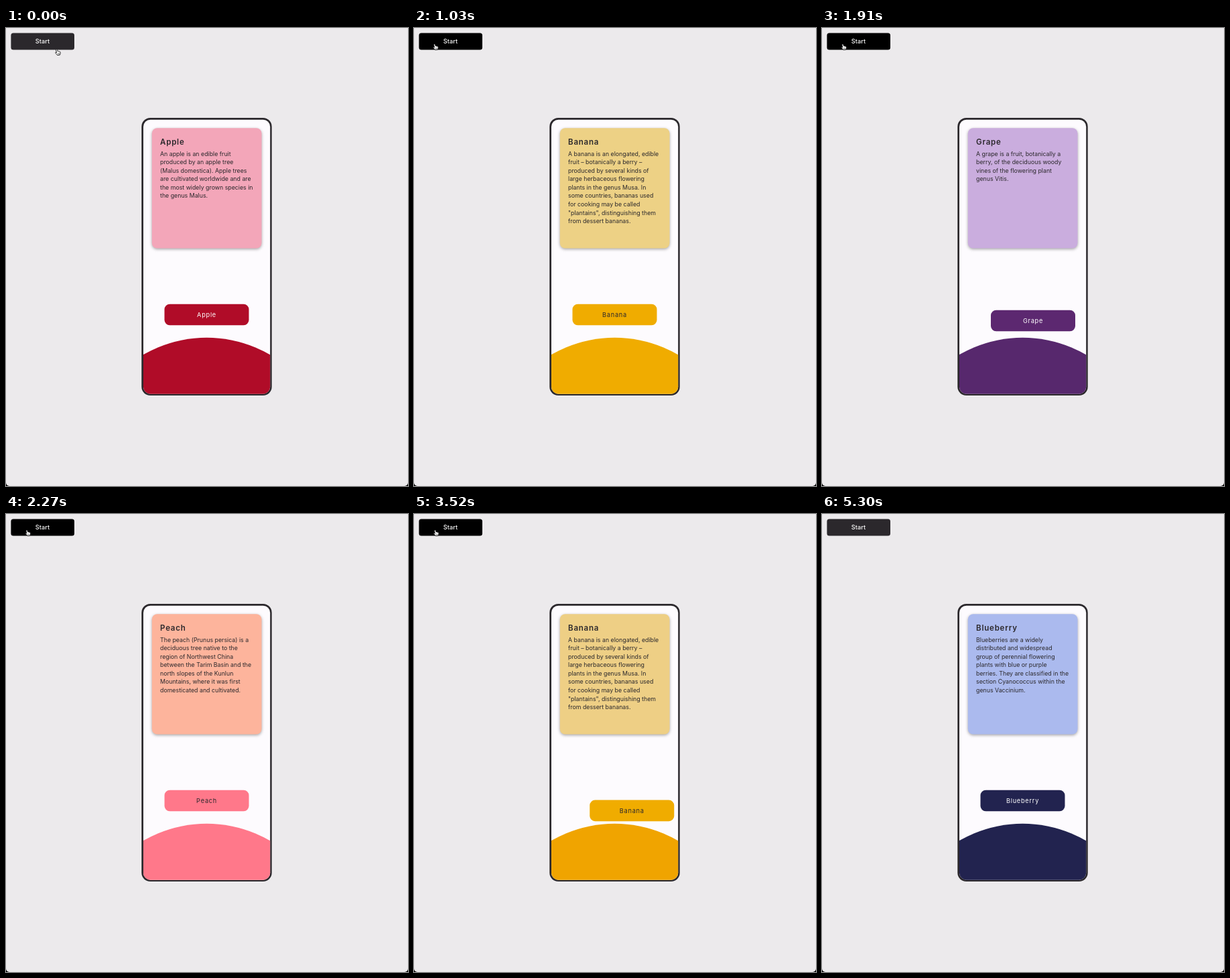
An HTML page with a canvas for the animation above (5670 ms loop, 600x683 px).

```html
<!DOCTYPE html>
<html lang="en">
<head>
<meta charset="utf-8">
<title>Fruit roulette</title>
<style>
  html, body { margin: 0; width: 100%; height: 100%; overflow: hidden; background: #eceaec; }
  canvas { display: block; width: 600px; height: 683px; }
</style>
</head>
<body>
<canvas id="stage"></canvas>
<script>
const W = 600, H = 683, LOOP = 5670;
const DARK = '#2b282c', FONT = 'Inter, "Open Sans", sans-serif';
const canvas = document.getElementById('stage');
const ctx = canvas.getContext('2d');
const dpr = window.devicePixelRatio || 1;
canvas.width = W * dpr;
canvas.height = H * dpr;

const fruits = [
  { name: 'Apple', main: [176, 12, 40], card: [243, 166, 185], ink: '#fff', lines: [
    'An apple is an edible fruit', 'produced by an apple tree', '(Malus domestica). Apple trees',
    'are cultivated worldwide and are', 'the most widely grown species in', 'the genus Malus.'] },
  { name: 'Orange', main: [238, 120, 0], card: [246, 196, 134], ink: DARK, lines: [
    'An orange is a fruit of various', 'citrus species in the family', 'Rutaceae; it primarily refers to',
    'Citrus sinensis, which is also', 'called sweet orange.'] },
  { name: 'Banana', main: [240, 172, 0], card: [237, 209, 133], ink: DARK, lines: [
    'A banana is an elongated, edible', 'fruit – botanically a berry –', 'produced by several kinds of',
    'large herbaceous flowering', 'plants in the genus Musa. In', 'some countries, bananas used',
    'for cooking may be called', '"plantains", distinguishing them', 'from dessert bananas.'] },
  { name: 'Kiwifruit', main: [112, 126, 0], card: [201, 213, 104], ink: '#fff', lines: [
    'Kiwifruit or Chinese gooseberry', 'is the edible berry of several', 'species of woody vines in the',
    'genus Actinidia.'] },
  { name: 'Blueberry', main: [34, 35, 79], card: [171, 186, 238], ink: '#fff', lines: [
    'Blueberries are a widely', 'distributed and widespread', 'group of perennial flowering',
    'plants with blue or purple', 'berries. They are classified in the', 'section Cyanococcus within the',
    'genus Vaccinium.'] },
  { name: 'Grape', main: [92, 40, 112], card: [205, 172, 220], ink: '#fff', lines: [
    'A grape is a fruit, botanically a', 'berry, of the deciduous woody', 'vines of the flowering plant',
    'genus Vitis.'] },
  { name: 'Peach', main: [255, 120, 138], card: [253, 180, 156], ink: DARK, lines: [
    'The peach (Prunus persica) is a', 'deciduous tree native to the', 'region of Northwest China',
    'between the Tarim Basin and the', 'north slopes of the Kunlun', 'Mountains, where it was first',
    'domesticated and cultivated.'] },
  { name: 'Strawberry', main: [216, 40, 72], card: [248, 172, 182], ink: '#fff', lines: [
    'The garden strawberry is a', 'widely grown hybrid species of', 'the genus Fragaria, cultivated',
    'worldwide for their fruit.'] }
];

const STEPS = 12, FIRST = 461.6, GAP = 324.3, SLIDE = 190;
// The last two turns come a little later than the rest.
const stepStart = k => FIRST + k * GAP + Math.max(0, k - 9) * 32.5;

const clamp = x => Math.min(1, Math.max(0, x));
const ease = x => (1 - Math.cos(Math.PI * clamp(x))) / 2;
const mix = (a, b, p) => a + (b - a) * p;
const blend = (a, b, p) => `rgb(${a.map((v, i) => Math.round(mix(v, b[i], p)))})`;

function box(x, y, w, h, r, fill) {
  ctx.beginPath();
  ctx.roundRect(x, y, w, h, r);
  ctx.fillStyle = fill;
  ctx.fill();
}

function text(str, x, y, size, weight, color, gap = 0, align = 'left') {
  ctx.font = `${weight} ${size}px ${FONT}`;
  ctx.letterSpacing = gap + 'px';
  ctx.textAlign = align;
  ctx.fillStyle = color;
  ctx.fillText(str, x, y);
}

function wheelState(t) {
  let k = -1;
  while (k + 1 < STEPS && t >= stepStart(k + 1)) k++;
  const at = i => fruits[(i + fruits.length) % fruits.length];
  const p = k < 0 ? 1 : ease((t - stepStart(k)) / SLIDE);
  return { prev: at(k), cur: at(k + 1), p };
}

function drawCard(s) {
  ctx.save();
  ctx.shadowColor = 'rgba(0,0,0,.35)';
  ctx.shadowBlur = 4 * dpr;
  ctx.shadowOffsetY = 1.5 * dpr;
  box(217.8, 149.2, 163.7, 179.3, 8, blend(s.prev.card, s.cur.card, s.p));
  ctx.restore();
  text(s.cur.name, 230, 173.5, 11.5, 600, DARK, 0.8);
  s.cur.lines.forEach((line, i) => text(line, 230, 190.6 + i * 12.56, 8.8, 400, DARK));
}

// Labels travel along lines sloping 30 degrees away from the centre.
function drawLabel(fruit, dx) {
  const x = 299.5 + dx, y = 427.5 + Math.abs(dx) * Math.tan(Math.PI / 6);
  box(x - 63, y - 15.8, 126, 31.6, 8, blend(fruit.main, fruit.main, 0));
  text(fruit.name, x, y + 3.3, 9.2, 400, fruit.ink, 0.75, 'center');
}

function drawPhone(s) {
  box(202.3, 134, 194.4, 414, 13, DARK);
  ctx.save();
  ctx.beginPath();
  ctx.roundRect(205, 136.7, 189.2, 409, 10.5);
  ctx.clip();
  ctx.fillStyle = '#fdfbfe';
  ctx.fillRect(200, 130, 200, 420);
  drawCard(s);
  const span = 164;
  if (s.p < 1) drawLabel(s.prev, -span * s.p);
  drawLabel(s.cur, span * (1 - s.p));
  ctx.beginPath();
  ctx.arc(299.5, 650.8, 189, 0, Math.PI * 2);
  ctx.fillStyle = blend(s.prev.main, s.cur.main, s.p);
  ctx.fill();
  ctx.restore();
}

function drawStart(t) {
  const hover = clamp((t - 30) / 120) * (1 - clamp((t - 4640) / 120));
  box(7.4, 7.4, 94.6, 25.2, 3.5, blend([43, 40, 44], [0, 0, 0], hover));
  text('Start', 54.5, 23.2, 9.1, 500, '#fff', 0.1, 'center');
}

const hand = new Path2D('M2.2 .7 C2.9 .4 3.4 .8 3.6 1.5 L4.2 3.6 C4.8 3.2 5.4 3.4 5.6 3.9 ' +
  'C6.1 3.5 6.7 3.7 6.9 4.2 C7.6 4 8 4.4 8.1 5 C8.3 6.4 8 7.5 7.4 9 L3.7 9.4 ' +
  'C3.2 8.2 1.8 7.4 .8 6.2 C.4 5.5 1 5 1.7 5.3 L2.5 5.8 L1.6 1.8 C1.5 1.2 1.7 .8 2.2 .7 Z');

function drawCursor(t) {
  if (t > 4820) return;
  const arrive = ease(t / 330), leave = clamp((t - 4570) / 250) ** 1.6;
  const x = mix(73, 28, arrive) + clamp((t - 1100) / 3000) - leave * 36;
  const y = mix(31.2, 23.3, arrive) + leave * 44;
  ctx.save();
  ctx.translate(x, y);
  ctx.lineJoin = 'round';
  ctx.fillStyle = '#fff';
  ctx.strokeStyle = '#111';
  ctx.lineWidth = 0.9;
  ctx.fill(hand);
  ctx.stroke(hand);
  ctx.beginPath();
  for (const i of [0, 1, 2]) {
    ctx.moveTo(4.1 + i * 1.15, 6.3);
    ctx.lineTo(4.4 + i * 1.1, 8.1);
  }
  ctx.lineWidth = 0.5;
  ctx.stroke();
  ctx.restore();
}

function draw(t) {
  ctx.setTransform(dpr, 0, 0, dpr, 0, 0);
  ctx.fillStyle = '#000';
  ctx.fillRect(0, 0, W, H);
  box(0, 0, W, H, [0, 0, 5, 5], '#eceaec');
  drawStart(t);
  drawPhone(wheelState(t));
  drawCursor(t);
}

const began = performance.now();
function tick() {
  draw((performance.now() - began) % LOOP);
  requestAnimationFrame(tick);
}
tick();
</script>
</body>
</html>
```
